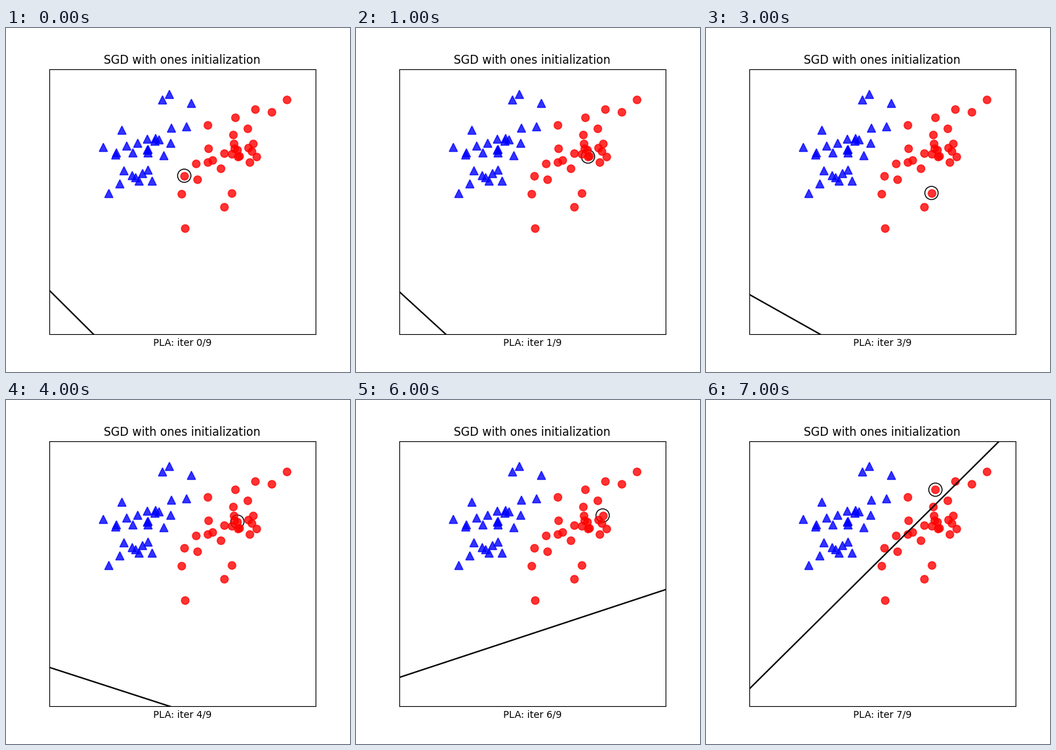
Recreate the animation shown at these times as a matplotlib script. Size 500 by 500 pixels, loop 8 s.

```python
import matplotlib.pyplot as plt
import numpy as np
from matplotlib.animation import FuncAnimation

STEPS = 8
TOTAL = 9
RATE = 0.05
N = 30

# Two Gaussian clouds with covariance [[.3, .2], [.2, .3]]:
# rows of AXES are its principal axes scaled by their deviations
AXES = np.array([[-0.5, -0.5], [-np.sqrt(0.05), np.sqrt(0.05)]])
rng = np.random.RandomState(2)


def cloud(mean):
    return mean + rng.standard_normal((N, 2)) @ AXES


blue = cloud((2, 2))
red = cloud((4, 2))


def nearest(spot):
    return red[np.argmin(np.hypot(*(red - spot).T))]


# Misclassified samples in the order they are picked
visited = np.array([nearest(spot) for spot in [
    (3.04, 1.58), (4.24, 2.02), (3.94, 0.88), (4.11, 1.20),
    (4.23, 2.18), (3.86, 1.76), (4.59, 2.32), (4.19, 2.91)]])


def weights(step):
    """Perceptron weights (bias, x, y) after the given number of updates."""
    return 1 - RATE * np.array([step, *visited[:step].sum(axis=0)])


fig, ax = plt.subplots(figsize=(5, 5), dpi=100)
fig.subplots_adjust(left=0.125, right=0.9, bottom=0.11, top=0.88)
ax.plot(*blue.T, "b^", markersize=8, alpha=0.8)
ax.plot(*red.T, "ro", markersize=8, alpha=0.8)
boundary, = ax.plot([], [], "k", linewidth=1.5)
ring = plt.Circle((0, 0), 0.15, color="k", fill=False)
ax.add_artist(ring)
ax.set(xlim=(0, 6), ylim=(-2, 4), xticks=[], yticks=[])
ax.set_title("SGD with ones initialization")
label = ax.set_xlabel("")


def update(step):
    bias, wx, wy = weights(step)
    x = np.array([-100, 100])
    boundary.set_data(x, -(bias + wx * x) / wy)
    ring.center = tuple(visited[step])
    label.set_text(f"PLA: iter {step}/{TOTAL}")
    return boundary, ring, label


anim = FuncAnimation(fig, update, frames=STEPS, interval=1000, repeat=True)
plt.show()
```
